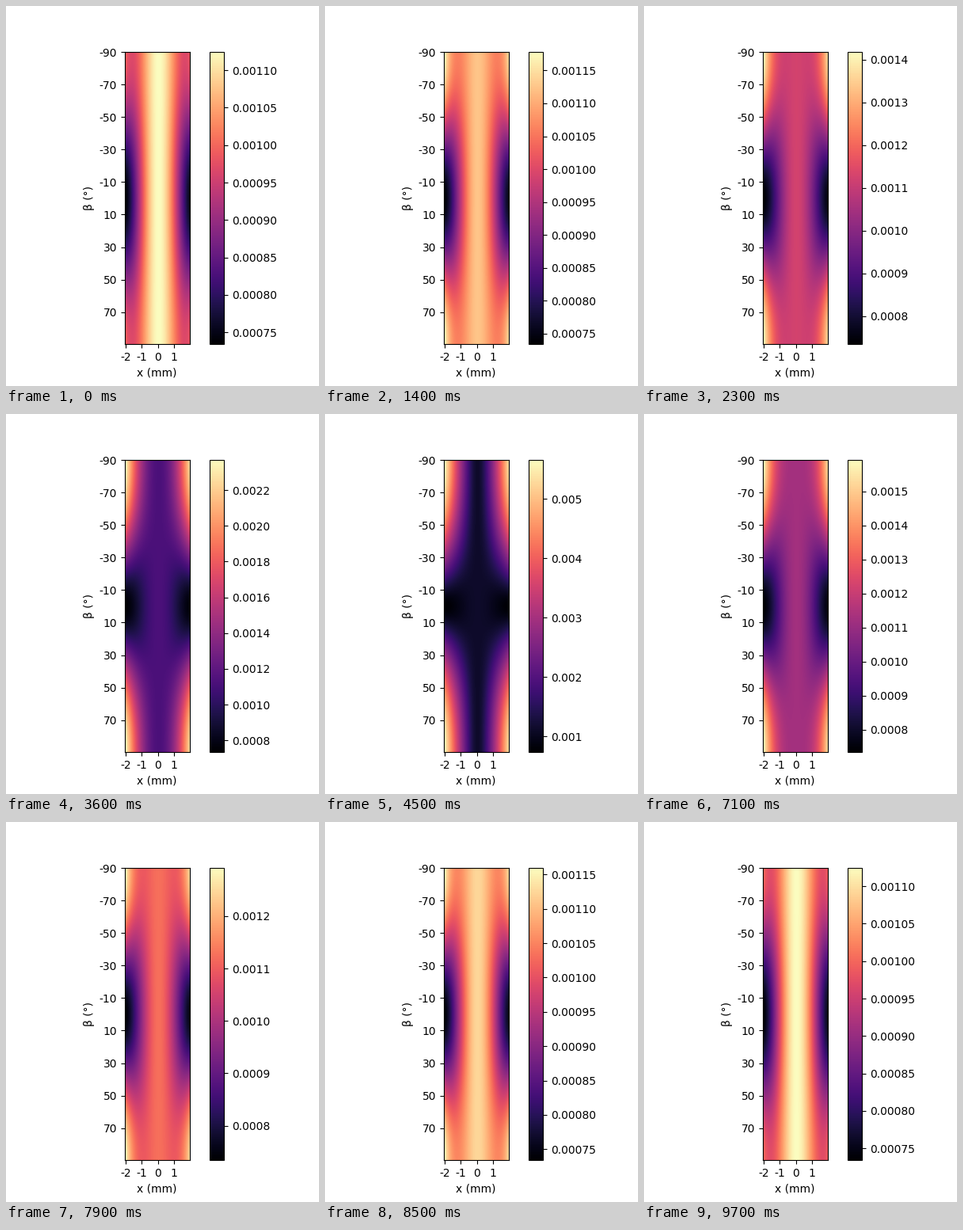
Recreate the animation shown at these times as a matplotlib script. Size 395 by 480 pixels, loop 9.8 s.

```python
import numpy as np
import matplotlib.pyplot as plt
from matplotlib.animation import FuncAnimation

WIDTH, HEIGHT, DPI = 395, 480, 100
FRAMES, INTERVAL = 98, 100
PEAK, FLOOR = 0.001125, 0.000734  # axial field at x = 0 and x = -2

plt.rcParams["font.family"] = "DejaVu Sans"

x = -2 + 0.1 * np.arange(40)
beta = np.arange(-90, 90, 0.5)
wave = np.cos(1.33 * x)
axial = FLOOR + (PEAK - FLOOR) * (wave - wave[0]) / (1 - wave[0])
transverse = np.outer(np.sin(np.radians(beta)), (np.abs(x) / 2) ** 1.05)


def field(frame):
    """Field magnitude; the transverse part grows like 1/distance and back."""
    distance = 51 - min(frame, FRAMES - frame)
    strength = 1 / (29.76 * distance - 0.0122 * distance**2)
    return np.hypot(axial, strength * transverse)


def add_axes(left, width):
    return fig.add_axes([left / WIDTH, 0.11, width / WIDTH, 0.77])


fig = plt.figure(figsize=(WIDTH / DPI, HEIGHT / DPI), dpi=DPI)
height = 0.77 * HEIGHT
ax = add_axes(149.67, height * 40 / 180)
image = ax.imshow(field(0), cmap="magma", aspect="auto")
ax.set_xticks(range(0, 40, 10), ["-2", "-1", "0", "1"])
ax.set_yticks(range(0, 360, 40), [str(b) for b in range(-90, 90, 20)])
ax.set_xlabel("x (mm)")
ax.set_ylabel("β (°)")
fig.colorbar(image, cax=add_axes(256.6, height / 20))


def update(frame):
    values = field(frame)
    image.set_data(values)
    image.set_clim(values.min(), values.max())
    return [image]


animation = FuncAnimation(fig, update, frames=FRAMES, interval=INTERVAL,
                          repeat=True, repeat_delay=0, blit=False)
plt.show()
```
